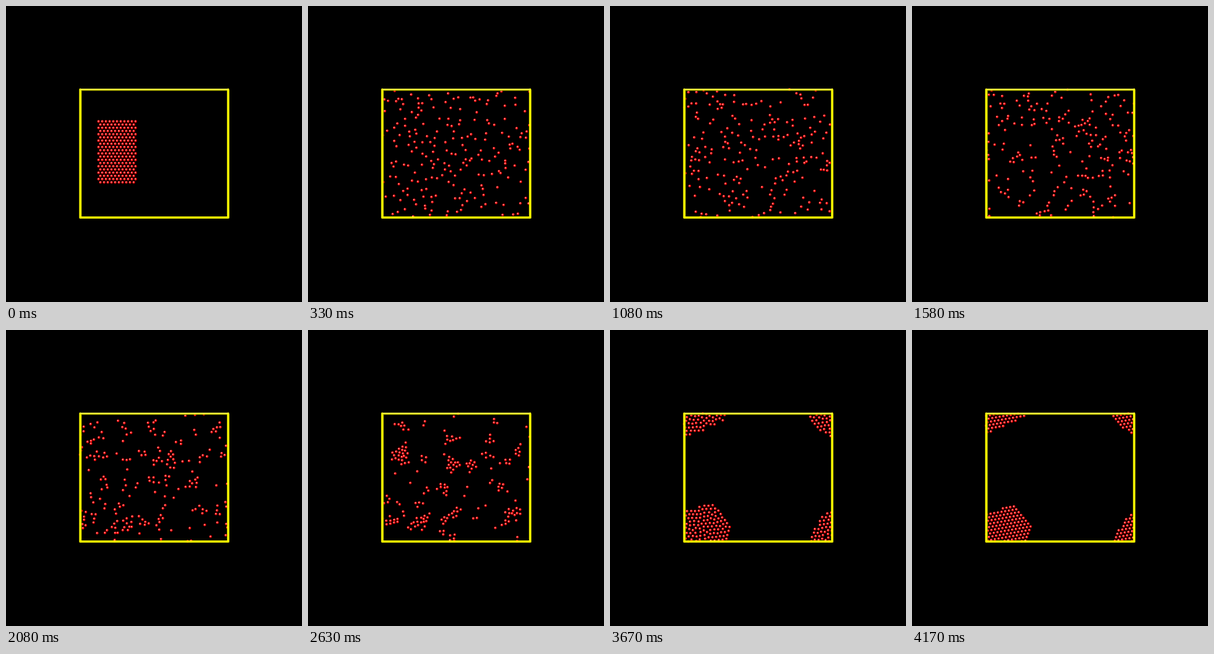
These frames come from a looping animation (512x512 px, 4.21 s). An HTML page:

```html
<!DOCTYPE html>
<html lang="en">
<head>
<meta charset="utf-8">
<title>Condensing particles</title>
<style>
  html, body { margin: 0; width: 100%; height: 100%; overflow: hidden; background: #000; }
  svg { display: block; width: 100vw; height: 100vh; }
</style>
</head>
<body>
<svg viewBox="0 0 512 512">
  <defs>
    <radialGradient id="ball" cx=".4" cy=".4" r=".62">
      <stop offset="0" stop-color="#fff"/>
      <stop offset=".2" stop-color="#ffb0b0"/>
      <stop offset=".42" stop-color="#ff1010"/>
      <stop offset=".75" stop-color="#f00000"/>
      <stop offset="1" stop-color="#800000"/>
    </radialGradient>
    <circle id="atom" r="2.4" fill="url(#ball)"/>
  </defs>
  <rect width="512" height="512"/>
  <g id="atoms"></g>
  <g fill="none" stroke-linecap="round">
    <path d="M130.5 146V364M130 146.3H383M386 145V367" stroke="#888800"/>
    <path d="M128.4 144.4V366M384.2 144.4V366M128.4 365.9H384.2" stroke="#ff0" stroke-width="3.7"/>
    <path d="M128.4 144.4H384.2" stroke="#ff0" stroke-width="2.8"/>
    <path d="M129 144H384" stroke="#ffff88"/>
  </g>
</svg>
<script>
const LOOP = 4210, STEP = 1000 / 24, FRAMES = 101, SUBSTEPS = 10;
const SPACING = 6.4, ROW = SPACING * Math.sqrt(3) / 2, RANGE = 11;
const W = 40 * SPACING, H = 40 * ROW, LEFT = 128.2, TOP = 144.3;
const GATHER = 62, FREEZE = 82;

let seed = 20;
function random() {
  seed = (seed * 1664525 + 1013904223) % 4294967296;
  return seed / 4294967296;
}
const spread = () => random() + random() + random() - 1.5;
const clamp = v => Math.max(0, Math.min(1, v));
const smooth = v => (v = clamp(v), v * v * (3 - 2 * v));
const mix = (a, b, t) => a + (b - a) * clamp(t);
const nearest = (d, size) => d - size * Math.round(d / size);
const wrap = (v, size) => v - size * Math.floor(v / size);

// Staggered block of 20 rows, 11 and 10 balls in turn
function makeAtoms() {
  const atoms = [];
  for (let row = 0; row < 20; row++) {
    const odd = row % 2;
    for (let col = 0; col < 11 - odd; col++) {
      const x = (5 + col + odd / 2) * SPACING, y = (10 + row) * ROW;
      atoms.push({
        x, y,
        vx: 1.4 * spread() + .02 * (x - 10 * SPACING),
        vy: 1.4 * spread() + .007 * (y - 19.5 * ROW),
        fx: 0, fy: 0,
        start: random() < .15 ? 73 + 7 * random() : GATHER + 2.5 * random()
      });
    }
  }
  return atoms;
}

function applyPairs(atoms, attraction) {
  for (const a of atoms) a.fx = a.fy = 0;
  for (let i = 0; i < atoms.length; i++) {
    const a = atoms[i];
    for (let j = 0; j < i; j++) {
      const b = atoms[j];
      const dx = nearest(b.x - a.x, W);
      if (dx > RANGE || dx < -RANGE) continue;
      const dy = nearest(b.y - a.y, H);
      const r2 = dx * dx + dy * dy;
      if (r2 > RANGE * RANGE || r2 < 1e-6) continue;
      const r = Math.sqrt(r2), gap = r - SPACING;
      const f = (gap < 0 ? .3 * gap : attraction * gap * (RANGE - r)) / r;
      a.fx += f * dx; a.fy += f * dy;
      b.fx -= f * dx; b.fy -= f * dy;
    }
  }
}

function steer(a, goal, rate, noise) {
  const dx = nearest(goal.x - a.x, W), dy = nearest(goal.y - a.y, H);
  const d = Math.hypot(dx, dy) + 1e-6, speed = Math.min(1.5, rate * d);
  a.vx += .1 * (dx / d * speed - a.vx) + noise * spread();
  a.vy += .1 * (dy / d * speed - a.vy) + noise * spread();
}

function advance(atoms, sites, time) {
  const frozen = time >= FREEZE;
  applyPairs(atoms, frozen ? 0 : .028 * clamp((time - 22) / 40));
  let energy = 0;
  atoms.forEach((a, i) => {
    a.vx += a.fx;
    a.vy += a.fy;
    if (frozen) steer(a, sites[i], .03, 0);
    else if (time > a.start) steer(a, { x: 16, y: 216 }, .012, .05);
    energy += a.vx * a.vx + a.vy * a.vy;
  });
  // Gradual cooling until the droplet starts to gather
  const rms = Math.sqrt(energy / atoms.length);
  const wanted = time < 15 ? mix(1.1, .8, time / 15) : mix(.8, .5, (time - 15) / 45);
  const scale = time < GATHER ? 1 + .05 * (wanted / rms - 1) : 1;
  for (const a of atoms) {
    a.x += a.vx *= scale;
    a.y += a.vy *= scale;
  }
}

// Tilted hexagonal crystal cut to a faceted outline across the corner
function makeCrystal(count) {
  const cx = 149, cy = 352, a = 6.45, tilt = -.17;
  const outline = [[-29, -29], [29, -48], [57, -11], [45, 17], [-14, 45], [-29, 45], [-52, 22], [-55, 10]];
  const reach = (x, y) => Math.max(...outline.map(([px, py], i) => {
    const [qx, qy] = outline[(i + 1) % outline.length], ex = qx - px, ey = qy - py;
    return (ex * y - ey * x) / (ex * py - ey * px);
  }));
  const sites = [];
  for (let i = -30; i <= 30; i++) for (let j = -30; j <= 30; j++) {
    const x = 136 + a * (i * Math.cos(tilt) + j * Math.cos(tilt + Math.PI / 3));
    const y = 318 + a * (i * Math.sin(tilt) + j * Math.sin(tilt + Math.PI / 3));
    sites.push({ x: x - LEFT, y: y - TOP, reach: reach(x - cx, y - cy) });
  }
  return sites.sort((p, q) => p.reach - q.reach).slice(0, count);
}

// Swap sites until every ball has a short way to go
function matchSites(points, sites) {
  const cost = (p, s) => nearest(p.x - s.x, W) ** 2 + nearest(p.y - s.y, H) ** 2;
  let changed = true;
  for (let pass = 0; changed && pass < 25; pass++) {
    changed = false;
    for (let i = 0; i < points.length; i++) for (let j = 0; j < i; j++) {
      const now = cost(points[i], sites[i]) + cost(points[j], sites[j]);
      const swapped = cost(points[i], sites[j]) + cost(points[j], sites[i]);
      if (swapped < now - 1e-6) {
        [sites[i], sites[j]] = [sites[j], sites[i]];
        changed = true;
      }
    }
  }
}

function simulate() {
  const atoms = makeAtoms(), sites = makeCrystal(atoms.length), frames = [];
  for (let k = 0; k < FRAMES; k++) {
    if (k >= FREEZE) matchSites(atoms, sites);
    const settle = smooth((k - 93) / 6);
    frames.push(atoms.map((a, i) => ({
      x: wrap(a.x + settle * nearest(sites[i].x - a.x, W), W),
      y: wrap(a.y + settle * nearest(sites[i].y - a.y, H), H)
    })));
    for (let s = 0; s < SUBSTEPS; s++) advance(atoms, sites, k + s / SUBSTEPS);
  }
  return frames;
}

const frames = simulate();
const group = document.getElementById("atoms");
const balls = frames[0].map(() => {
  const ball = document.createElementNS("http://www.w3.org/2000/svg", "use");
  ball.setAttribute("href", "#atom");
  return group.appendChild(ball);
});

let shown = -1;
function render(ms) {
  const tick = Math.floor(ms / 10) * 10 + 4.9;
  const k = Math.min(FRAMES - 1, Math.floor(tick / STEP));
  if (k === shown) return;
  shown = k;
  frames[k].forEach((p, i) => {
    balls[i].setAttribute("transform", `translate(${(LEFT + p.x).toFixed(2)} ${(TOP + p.y).toFixed(2)})`);
  });
}

const begin = performance.now();
function loop() {
  render((performance.now() - begin) % LOOP);
  requestAnimationFrame(loop);
}
loop();
</script>
</body>
</html>
```
